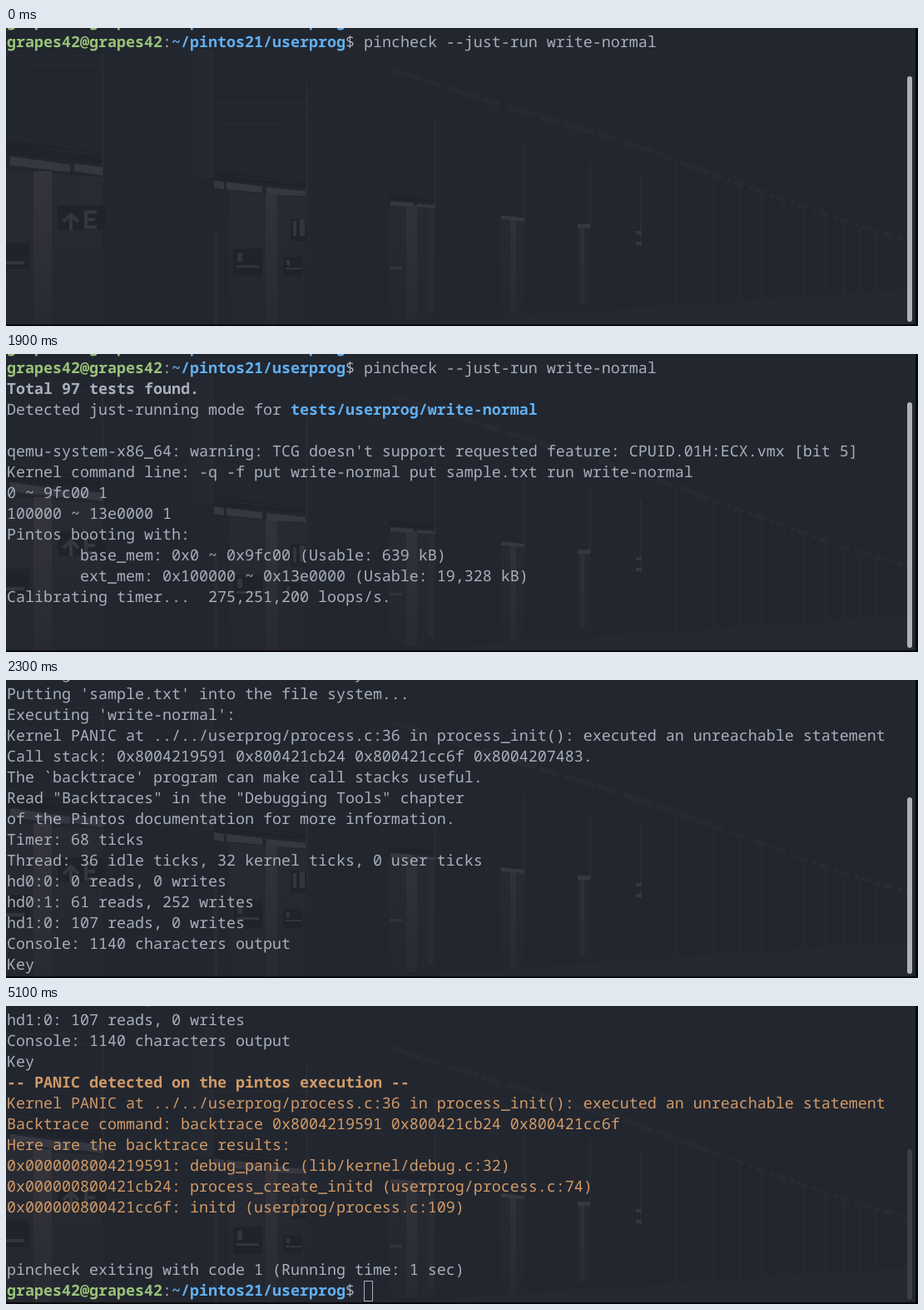
An HTML page that plays this animation: 1096 px wide and 358 px high, repeating every 5.2 s.

```html
<!DOCTYPE html>
<html lang="en">
<head>
<meta charset="utf-8">
<title>Terminal session</title>
<style>
html, body { margin: 0; width: 100%; height: 100%; overflow: hidden; background: #22262f; }
#stage { position: relative; width: 1096px; height: 358px; overflow: hidden; }
#stage > * { position: absolute; }
svg { left: 0; top: 0; }
pre {
  left: 1px; margin: 0; color: #a9afba; white-space: pre;
  font: 18.3333px/25px "Noto Sans Mono", "DejaVu Sans Mono", monospace;
  font-kerning: none; font-variant-ligatures: none; text-rendering: geometricPrecision;
}
b { font-weight: 600; }
.green { color: #98c379; }
.blue { color: #61afef; }
.orange { color: #d19a66; }
#cursor { width: 11px; height: 25px; box-sizing: border-box; border: 1px solid #a9adbb; }
#bar { left: 1083px; width: 6px; border-radius: 3px; }
</style>
</head>
<body>
<div id="stage">
  <svg width="1096" height="358">
    <defs>
      <linearGradient id="pillar"><stop offset="0" stop-color="#22262e"/><stop offset="1" stop-color="#272a32"/></linearGradient>
      <linearGradient id="wall" x2="0" y2="1"><stop offset="0" stop-color="#282b34"/><stop offset="1" stop-color="#24272f"/></linearGradient>
      <linearGradient id="lit" x2="0" y2="1"><stop offset="0" stop-color="#35343c"/><stop offset="1" stop-color="#292a31"/></linearGradient>
    </defs>
    <path fill="url(#wall)" d="M0 172L116 180V358H0zM268 196L360 204V358H268zM460 214H516V350H460zM595 232H623V345H595zM687 240H702V335H687z"/>
    <path fill="#20232b" d="M0 135L116 150V163L0 152zM250 170L360 186V191L250 183zM460 200L516 206V209L460 207z"/>
    <path fill="none" stroke="#292c35" d="M0 34H115M30 45H115M0 58H70M250 90H360M250 103H360M262 116H330M0 130L60 138M50 146L116 152M275 178L350 186"/>
    <path fill="url(#pillar)" d="M212 25H250V180H212z"/>
    <path fill="#24272f" d="M362 70H366V358H362zM435 50H460V205H435zM580 90H592V225H580zM675 118H686V235H675zM748 140H757V242H748z"/>
    <path fill="url(#lit)" d="M33 172H55V358H33zM312 198H326V358H312zM481 214H494V350H481zM606 230H613V345H606zM690 240H695V330H690z"/>
    <path fill="#2a2c34" d="M92 178H106V213H92zM250 245H254V358H250zM508 218H514V340H508z"/>
    <path fill="none" stroke="#292c34" stroke-width="2" d="M116 30V185M361 65V240M516 108V215M623 138V235M702 160V240M763 175V262"/>
    <path fill="none" stroke="#272a33" stroke-width="7" stroke-dasharray="38 4 22 9" d="M462 50Q580 88 680 118T850 176"/>
    <path fill="none" stroke="#282b34" stroke-width="4" stroke-dasharray="12 6 5 4" d="M850 176L950 212L1010 233L1085 255"/>
    <path fill="none" stroke="#252931" stroke-width="3" d="M806 155V335M850 178V332M881 189V330M908 198V328M935 208V326M960 217V324M985 225V322M1006 232V320M1026 239V318M1045 244V316"/>
    <path fill="#24282f" d="M520 352L1085 314V356H520z"/>
    <g fill="#363741">
      <path d="M5 154L76 164Q80 168 76 173L5 165zM82 163L116 167V177L82 172z"/>
      <path d="M250 183L262 185V194L250 192zM265 185L308 190V198L265 194zM313 191L360 196V202L313 200z"/>
      <path d="M462 208L490 210V215L462 213zM494 211L516 213V216L494 215zM595 225L622 228V232L595 230zM687 235H702V240H687zM757 244H764V248H757zM757 257H764V261H757z"/>
    </g>
    <path fill="#20232a" d="M62 213H120V242H62zM273 265H308V298H273zM333 275H356V298H333zM0 258H28V290H0zM342 229H361V256H342z"/>
    <path fill="none" stroke="#343740" stroke-width="4" d="M78 243V225M69 233L78 224L87 233M109 221H96V239H109M96 230H107"/>
    <path fill="#32353d" d="M278 270H284V281H278zM277 285H304V288H277zM337 279H341V285H337zM336 288H355V290H336zM0 280H22V284H0zM461 287H476V290H461zM345 232H349V250H345zM353 230H359V250H353z"/>
    <path fill="#08090c" d="M1093 0H1096V358H1093zM0 356H1096V358H0z"/>
  </svg>
  <pre id="text"></pre>
  <div id="cursor"></div>
  <div id="bar"></div>
</div>
<script>
const tint = (color, s) => `<span class="${color}">${s}</span>`;
const bold = (color, s) => `<b class="${color}">${s}</b>`;
const user = 'grapes42';
const prompt = bold('green', `${user}@${user}`) + ':' + bold('blue', '~/pintos21/userprog') + '$ ';
const panic = 'Kernel PANIC at ../../userprog/process.c:36 in process_init(): executed an unreachable statement';

const lines = `${prompt}pincheck --just-run write-normal
${bold('', 'Total 97 tests found.')}
Detected just-running mode for ${bold('blue', 'tests/userprog/write-normal')}

qemu-system-x86_64: warning: TCG doesn't support requested feature: CPUID.01H:ECX.vmx [bit 5]
Kernel command line: -q -f put write-normal put sample.txt run write-normal
0 ~ 9fc00 1
100000 ~ 13e0000 1
Pintos booting with:
        base_mem: 0x0 ~ 0x9fc00 (Usable: 639 kB)
        ext_mem: 0x100000 ~ 0x13e0000 (Usable: 19,328 kB)
Calibrating timer...  275,251,200 loops/s.
hd0:0: detected 345 sector (172 kB) disk, model "QEMU HARDDISK", serial "QM00001"
hd0:1: detected 20,160 sector (9 MB) disk, model "QEMU HARDDISK", serial "QM00002"
hd1:0: detected 107 sector (53 kB) disk, model "QEMU HARDDISK", serial "QM00003"
Formatting file system...done.
Boot complete.
Putting 'write-normal' into the file system...
Putting 'sample.txt' into the file system...
Executing 'write-normal':
${panic}
Call stack: 0x8004219591 0x800421cb24 0x800421cc6f 0x8004207483.
The \`backtrace' program can make call stacks useful.
Read "Backtraces" in the "Debugging Tools" chapter
of the Pintos documentation for more information.
Timer: 68 ticks
Thread: 36 idle ticks, 32 kernel ticks, 0 user ticks
hd0:0: 0 reads, 0 writes
hd0:1: 61 reads, 252 writes
hd1:0: 107 reads, 0 writes
Console: 1140 characters output
Key
${bold('orange', '-- PANIC detected on the pintos execution --')}
${tint('orange', panic)}
${tint('orange', 'Backtrace command: backtrace 0x8004219591 0x800421cb24 0x800421cc6f')}
${tint('orange', 'Here are the backtrace results:')}
${tint('orange', '0x0000008004219591: debug_panic (lib/kernel/debug.c:32)')}
${tint('orange', '0x000000800421cb24: process_create_initd (userprog/process.c:74)')}
${tint('orange', '0x000000800421cc6f: initd (userprog/process.c:109)')}


pincheck exiting with code 1 (Running time: 1 sec)
${prompt}`.split('\n');

// start time, last line, its visible length, cursor look
const ALL = Infinity;
const steps = [
  [0, 0, ALL, ''], [400, 0, ALL, 'block'], [1100, 0, ALL, ''],
  [1200, 1, 0, 'block'], [1300, 2, 0, 'block'], [1400, 4, 0, 'block'],
  [1500, 5, 0, 'block'], [1600, 11, 20, 'block'], [1900, 12, 0, ''],
  [2000, 14, 0, ''], [2200, 22, 22, ''], [2300, 31, ALL, ''],
  [2400, 42, ALL, ''], [2500, 42, ALL, 'block'], [3000, 42, ALL, ''],
  [3600, 42, ALL, 'block'], [4200, 42, ALL, ''], [4900, 42, ALL, 'block'],
  [5100, 42, ALL, 'outline'],
];
const LOOP = 5200, ROW = 25, COL = 11, ROWS = 14;
const [text, cursor, bar] = ['text', 'cursor', 'bar'].map(id => document.getElementById(id));

function show([, last, length, look]) {
  const top = Math.max(0, last - ROWS + 1);
  const tail = lines[last].slice(0, length);
  text.innerHTML = [prompt, ...lines.slice(0, last), tail].join('\n');
  text.style.top = 4 - ROW * (top + 1) + 'px';

  const column = tail.replace(/<[^>]*>/g, '').length;
  cursor.style.left = 1 + COL * column + 'px';
  cursor.style.top = 5 + ROW * (last - top) + 'px';
  cursor.style.display = look ? 'block' : 'none';
  cursor.style.background = look === 'block' ? '#a9adbb' : 'none';

  const height = Math.round(13570 / (46 + top));
  bar.style.top = 353 - height + 'px';
  bar.style.height = height + 'px';
  bar.style.background = look === 'outline' ? '#3a3e47' : '#b0b1b5';
}

let current;
function frame(now) {
  const step = steps.findLast(s => s[0] <= now % LOOP);
  if (step !== current) show(current = step);
  requestAnimationFrame(frame);
}
frame(0);
</script>
</body>
</html>
```
